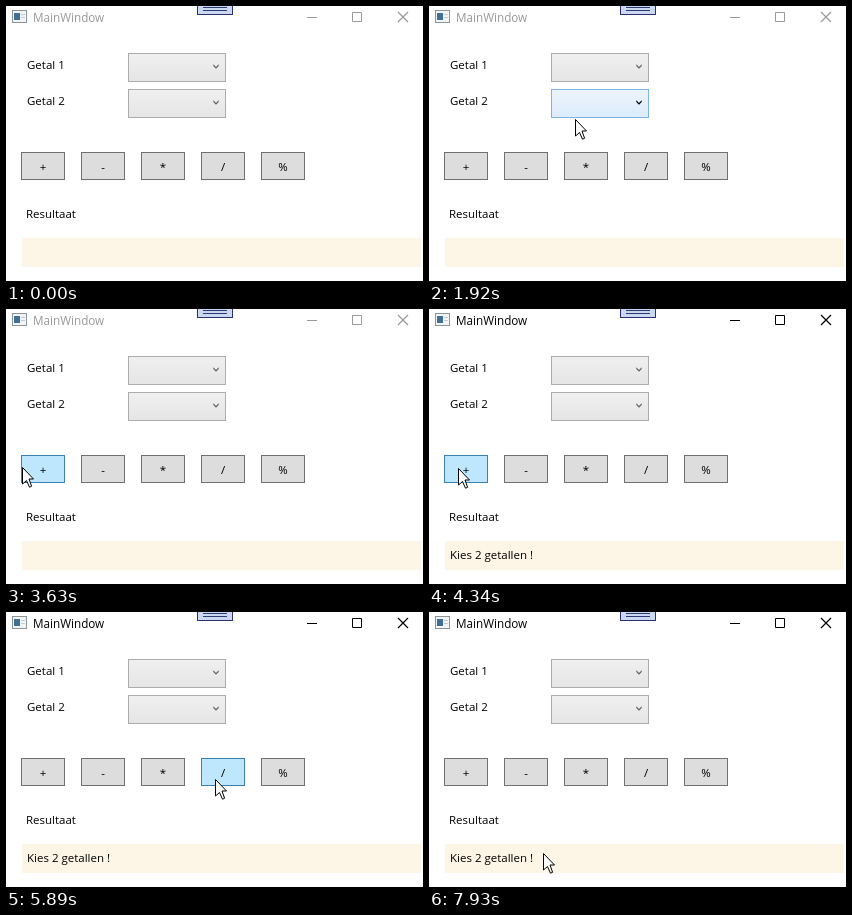
Write an HTML page that moves like this. It is 417 px wide and 275 px high and loops after 8 s.

```html
<!DOCTYPE html>
<html lang="nl">
<head>
<meta charset="utf-8">
<title>MainWindow</title>
<style>
  html, body { margin: 0; width: 100%; height: 100%; overflow: hidden; background: #fff; }
  svg { display: block; }
  text { font: 11.5px "Open Sans", "Noto Sans", sans-serif; fill: #000; }
  #caption text { font-size: 11.7px; fill: #999; }
  #caption path { stroke: #999; fill: none; }
  #caption.active text { fill: #000; }
  #caption.active path { stroke: #000; }
  .combo rect { fill: url(#idle); stroke: #acacac; }
  .combo path { fill: #606060; }
  .combo.hover rect { fill: url(#lit); stroke: #7eb4ea; }
  .combo.hover path { fill: #000; }
  .button rect { fill: #ddd; stroke: #707070; }
  .button text { text-anchor: middle; }
  .button.hover rect { fill: #bee6fd; stroke: #3c7fb1; }
  .button.pressed rect { fill: #c4e5f6; stroke: #2c628b; }
</style>
</head>
<body>
<svg width="417" height="275" viewBox="0 0 417 275">
  <defs>
    <linearGradient id="idle" x2="0" y2="1">
      <stop stop-color="#f0f0f0"/><stop offset="1" stop-color="#e5e5e5"/>
    </linearGradient>
    <linearGradient id="lit" x2="0" y2="1">
      <stop stop-color="#ecf4fc"/><stop offset="1" stop-color="#dcecfc"/>
    </linearGradient>
  </defs>

  <!-- window icon -->
  <rect x="6.5" y="4.5" width="14" height="12" fill="#f2f4f6" stroke="#8d959c"/>
  <rect x="8" y="7" width="6" height="7" fill="#3f6f94"/>
  <path d="M15 8.5H19M15 11.5H19" stroke="#c3ccd4"/>

  <!-- tool tab -->
  <rect x="191.5" y="-1.5" width="35" height="10" fill="#cbd8f2" stroke="#2c3070"/>
  <path d="M197 1.5H221M197 4.5H221" stroke="#2c3a70"/>

  <g id="caption">
    <text x="27" y="16">MainWindow</text>
    <path d="M301 11.5H311M346.5 6.5H355.5V15.5H346.5Z"/>
    <path d="M392 6L402 16M402 6L392 16" stroke-width="1.2"/>
  </g>

  <text x="21" y="63">Getal 1</text>
  <text x="21" y="99">Getal 2</text>
  <g id="controls"></g>
  <text x="20" y="212">Resultaat</text>
  <rect x="16" y="232" width="399" height="29" fill="#fdf5e6"/>
  <text id="result" x="21" y="250">Kies 2 getallen !</text>
  <path id="cursor" d="M.5 .5V17L4.5 13.5 7.5 20.2 9.6 19.3 7 12H11.5Z"
        fill="#fff" stroke="#000" stroke-linejoin="round"/>
</svg>
<script>
const LOOP = 8000, ENTER = 750, PRESS = 4190, RELEASE = 4265, HOVER_LAG = 60;

// Pointer stops: time, x, y.
const stops = [
  [ENTER, 397, 254],
  [1310, 215, 32], [1700, 215, 85], [1920, 146, 113],   // over both lists
  [2380, 40, 143], [2870, 244, 162], [3010, 272, 162],  // along the buttons
  [3180, 272, 162], [3630, 16, 158],                    // back to plus
  [4020, 29, 159], [4510, 29, 159],                     // click
  [4880, 40, 241], [5030, 96, 241],                     // along the result
  [5890, 209, 167], [6140, 324, 165], [6610, 280, 160], // buttons again
  [7044, 120, 172], [7300, 27, 254], [7930, 114, 241]
];

const $ = id => document.getElementById(id);
const controls = [];

function addControl(kind, x, y, width, height, content) {
  const node = document.createElementNS('http://www.w3.org/2000/svg', 'g');
  node.innerHTML = `<rect x="${x + .5}" y="${y + .5}" width="${width - 1}" height="${height - 1}"/>${content}`;
  $('controls').append(node);
  controls.push({ node, kind, x, y, width, height });
}

for (const y of [47, 83])
  addControl('combo', 122, y, 98, 29,
    `<path d="M207.3 ${y + 13}l2.7 2.7 2.7-2.7v-1.8l-2.7 2.7-2.7-2.7z"/>`);
[...'+-*/%'].forEach((sign, i) =>
  addControl('button', 15 + 60 * i, 146, 44, 28, `<text x="${37 + 60 * i}" y="164.5">${sign}</text>`));

function pointerAt(t) {
  const next = stops.findIndex(stop => stop[0] > t);
  const [t1, x1, y1] = stops.at(next);
  const [t0, x0, y0] = next > 0 ? stops[next - 1] : [t1 - 1, x1, y1];
  const k = Math.max(0, Math.min(1, (t - t0) / (t1 - t0)));
  return [x0 + (x1 - x0) * k, y0 + (y1 - y0) * k];
}

function render(t) {
  const visible = t >= ENTER;
  const [x, y] = pointerAt(t).map(Math.round);
  const [hx, hy] = pointerAt(t - HOVER_LAG);

  $('cursor').style.display = visible ? '' : 'none';
  $('cursor').setAttribute('transform', `translate(${x} ${y})`);
  $('caption').classList.toggle('active', t >= PRESS);
  $('result').style.display = t >= RELEASE ? '' : 'none';

  for (const c of controls) {
    const hover = visible && hx >= c.x && hx < c.x + c.width && hy >= c.y && hy < c.y + c.height;
    const pressed = hover && t >= PRESS && t < RELEASE;
    c.node.setAttribute('class', `${c.kind}${hover ? ' hover' : ''}${pressed ? ' pressed' : ''}`);
  }
}

const began = performance.now();
function tick() {
  render((performance.now() - began) % LOOP);
  requestAnimationFrame(tick);
}
tick();
</script>
</body>
</html>
```
